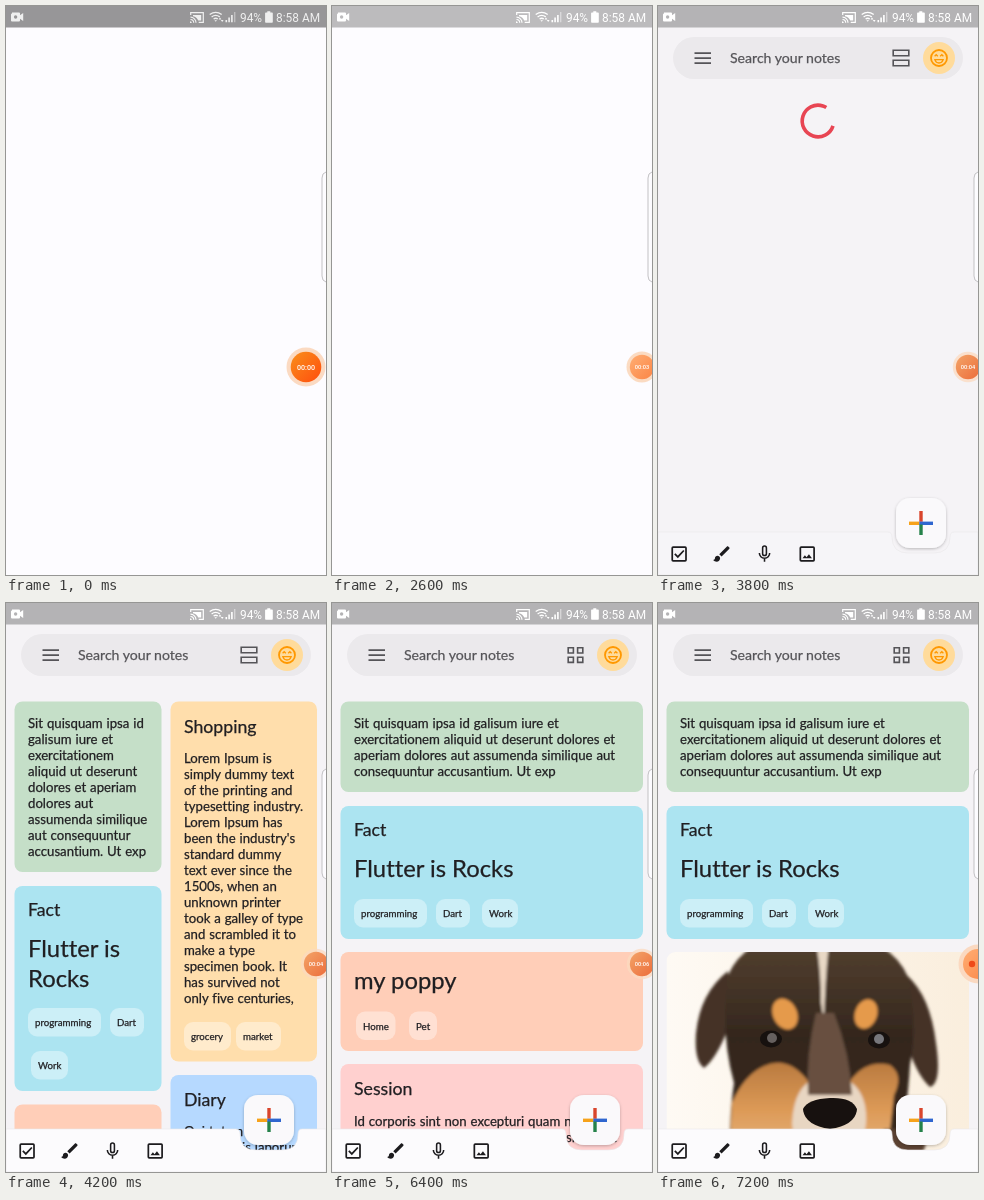
An HTML page for the animation above (8 s loop, 320 px wide and 569 px high).

```html
<!DOCTYPE html>
<html lang="en">
<head>
<meta charset="utf-8">
<title>Notes app</title>
<style>
html, body { margin: 0; width: 100%; height: 100%; overflow: hidden; background: #fdfcff; }
svg { display: block; width: 320px; height: 569px; }
text { font-family: Lato, sans-serif; font-variant-ligatures: none; fill: #201f22; white-space: pre; }
.status text { font: 11.9px Roboto, sans-serif; fill: #fff; }
.body { font-size: 13.2px; word-spacing: .04em; }
.title { font-size: 17.7px; }
.big { font-size: 23.8px; }
.chip { font-size: 9.7px; }
.body, .title, .big, .chip { stroke: #201f22; stroke-width: .25px; }
.line { fill: none; stroke: currentColor; }
#clock { font-family: Roboto, sans-serif; font-weight: 500; fill: #fff; text-anchor: middle; }
</style>
</head>
<body>
<svg viewBox="0 0 320 569">
  <defs>
    <linearGradient id="hot" x2="1" y2="1"><stop stop-color="#f98f1c"/><stop offset="1" stop-color="#ff4d0d"/></linearGradient>
    <linearGradient id="soft" x2="1" y2="1"><stop stop-color="#ffae74"/><stop offset="1" stop-color="#fb8545"/></linearGradient>
    <linearGradient id="dim" x2="1" y2="1"><stop stop-color="#f3a468"/><stop offset="1" stop-color="#ec6c3a"/></linearGradient>
    <linearGradient id="cream"><stop stop-color="#fefaf4"/><stop offset="1" stop-color="#faeedd"/></linearGradient>
    <linearGradient id="fur" x2="0" y2="1"><stop stop-color="#53402f"/><stop offset=".4" stop-color="#33261d"/><stop offset="1" stop-color="#3b2a1f"/></linearGradient>
    <linearGradient id="tan" x2="0" y2="1"><stop stop-color="#b97a3f"/><stop offset=".4" stop-color="#dd9a57"/><stop offset="1" stop-color="#ecc89c"/></linearGradient>
    <clipPath id="photo"><rect x="8.500" y="349" width="302.5" height="240" rx="9"/></clipPath>
    <filter id="blur"><feGaussianBlur stdDeviation="1.6"/></filter>
    <filter id="shadow" x="-30%" y="-30%" width="160%" height="160%">
      <feDropShadow dx="0" dy="1" stdDeviation="1.6" flood-opacity=".25"/>
    </filter>
  </defs>
  <rect width="320" height="569" fill="#fdfcff"/>

  <g data-t="3400 8000">
    <rect y="21" width="320" height="548" fill="#f5f3f6"/>
    <rect x="15" y="31" width="290" height="42" rx="21" fill="#ebe9ec"/>
    <g color="#555458">
      <path class="line" d="M36.500 47.200h16.500M36.500 52.200h16.500M36.500 57.200h16.500" stroke-width="1.7"/>
      <text x="72" y="56.800" font-size="14.1" style="fill:#555458;stroke:#555458;stroke-width:.25px">Search your notes</text>
      <path class="line" data-t="0 6400" d="M235.2 44.2h15.6v5.6h-15.6zM235.2 54.2h15.6v5.6h-15.6z" stroke-width="1.6"/>
      <path class="line" data-t="6400 8000" d="M236.2 44.8h5.2v5.2h-5.2zM245.6 44.8h5.2v5.2h-5.2zM236.2 54.2h5.2v5.2h-5.2zM245.6 54.2h5.2v5.2h-5.2z" stroke-width="1.6"/>
    </g>
    <circle cx="281" cy="52" r="16" fill="#ffdb9b"/>
    <g class="line" color="#ff9800">
      <circle cx="281" cy="52" r="8" stroke-width="1.8"/>
      <path d="M276.600 50.300l1.600-1.600 1.600 1.600M282.200 50.300l1.600-1.600 1.600 1.600" stroke-width="1.3"/>
      <path d="M276.800 53.600h8.400q-1.200 3.400-4.200 3.400t-4.200-3.400z" stroke-width="1.3"/>
    </g>
    <circle id="spin" data-t="3400 4200" cx="160" cy="115" r="15.8" fill="none" stroke="#e84553" stroke-width="3.6" pathLength="360"/>

    <g id="grid" data-t="4200 6400"></g>
    <g id="list" data-t="6400 8000"></g>

    <g data-t="6800 8000" clip-path="url(#photo)">
      <rect x="8.500" y="349" width="302.5" height="220" fill="url(#cream)"/>
      <g filter="url(#blur)">
        <path d="M70 368Q42 390 38 430Q36 458 46 465Q58 456 70 426zM246 370Q272 390 278 440Q284 480 272 484Q254 468 244 420z" fill="#453326"/>
        <path d="M70 372Q82 346 108 338H212Q240 350 250 374Q260 420 252 462Q250 500 238 580H72Q70 520 76 480Q62 430 70 372z" fill="url(#fur)"/>
        <path d="M74 500Q86 472 106 463Q130 452 150 478Q172 466 192 478Q208 456 232 462Q246 472 236 492L226 580H70z" fill="url(#tan)"/>
        <path d="M158 340H171Q167 376 166 420L163 400Q163 366 158 340z" fill="#e9d9c6"/>
        <path d="M134 520Q136 484 156 476H188Q210 488 208 520L200 580H140z" fill="#e8d6c2"/>
        <path d="M158 410Q148 450 150 492H194Q192 450 176 410z" fill="#67503f"/>
        <ellipse cx="127" cy="411" rx="12" ry="16" fill="#e59a4c" transform="rotate(-25 127 411)"/>
        <ellipse cx="208" cy="411" rx="11" ry="15" fill="#e59a4c" transform="rotate(20 208 411)"/>
        <path d="M226 526H266Q276 548 240 580H220z" fill="#5b4330"/>
      </g>
      <g fill="#17110f">
        <ellipse cx="113" cy="436" rx="11" ry="8.5"/>
        <ellipse cx="221" cy="437" rx="11" ry="8.5"/>
        <path d="M145 506Q150 496 172 495T199 506Q198 522 172 526Q146 522 145 506z"/>
      </g>
      <circle cx="114" cy="435" r="5" fill="#66605f"/>
      <circle cx="221" cy="436" r="5" fill="#77777c"/>
    </g>

    <path id="bar" d="M0 526H230Q234 526 234 531Q234 547 250 547H276Q292 547 292 531Q292 526 296 526H320V569H0z" stroke="#e9e7ea" stroke-width=".6"/>
    <rect x="238" y="492" width="50" height="50" rx="14" fill="#faf9fb" filter="url(#shadow)"/>
    <path d="M261.3 505h3.4v10.800h-3.4z" fill="#d9452c"/>
    <path d="M251 515.600h10.500v3.4h-10.500z" fill="#f6a21a"/>
    <path d="M261.3 515.600h13.700v3.4h-13.700z" fill="#2f66cf"/>
    <path d="M261.3 518.500h3.4v10.500h-3.4z" fill="#25824a"/>

    <g color="#1c1b1e" fill="#1c1b1e">
      <g transform="translate(10.8 537.6) scale(.86)">
        <rect class="line" x="4" y="4" width="16" height="16" rx="1" stroke-width="2"/>
        <path class="line" d="M7 12l3.5 3.5L17.5 8" stroke-width="2"/>
      </g>
      <path transform="translate(53.5 537.6) scale(.86)" d="M7 14c-1.66 0-3 1.34-3 3 0 1.31-1.16 2-2 2 .92 1.22 2.49 2 4 2 2.21 0 4-1.79 4-4 0-1.66-1.34-3-3-3zm13.7-9.4l-1.3-1.3c-.4-.4-1-.4-1.4 0L9 12.25 11.75 15l9-9c.4-.4.4-1 0-1.4z"/>
      <g class="line" transform="translate(96.2 537.6) scale(.86)" stroke-width="1.8">
        <rect x="9.8" y="2.9" width="4.4" height="11" rx="2.2"/>
        <path d="M6 11a6 6 0 0 0 12 0M12 17v4"/>
      </g>
      <g transform="translate(138.9 537.6) scale(.86)">
        <rect class="line" x="4" y="4" width="16" height="16" rx="1" stroke-width="2"/>
        <path d="M14 12.3l-2.8 3.5-1.9-2.3L6.5 17h11z"/>
      </g>
    </g>
  </g>

  <path d="M322 166h-2q-4 1-4 6v98q0 5 4 6h2" fill="#fdfcff" stroke="#c2c1c4"/>

  <g class="status">
    <rect id="top" width="320" height="21.5"/>
    <g id="icons" color="#fff" fill="#fff">
      <path d="M6 6.5h7q1 0 1 1v1.8l3.2-2.3v8l-3.2-2.3v1.8q0 1-1 1h-7q-1 0-1-1v-6q0-1 1-1z"/>
      <circle id="lens" cx="9.6" cy="11" r="1.7"/>
      <path class="line" d="M184.7 9v-2.3h12.6v9.6h-4.6M184.5 11.2a5.5 5.5 0 0 1 5.5 5.5M184.5 13.5a3.2 3.2 0 0 1 3.2 3.2" stroke-width="1.2"/>
      <path d="M187 9h8.2v5.4h-3q-1.3-3.4-5.2-4.2zM184 15.2a1.8 1.8 0 0 1 1.8 1.8h-1.8z"/>
      <path class="line" d="M203.7 8.6q6-4.6 12 0M205.6 10.9q4-3 8.2 0M207.6 13q2.1-1.5 4.2 0" stroke-width="1.3"/>
      <path d="M208.4 14.2h2.6l-1.3 1.6zM212.6 13.5l1.4-2 1.4 2zM214.8 14l1.4 2 1.4-2z"/>
      <path d="M219.5 14h1.6v2.2h-1.6zM222.3 11.6h1.6v4.6h-1.6zM225.1 9h1.6v7.2h-1.6z"/>
      <path d="M228 6h1.4v10.2H228z" opacity=".45"/>
      <text x="234" y="15.6">94%</text>
      <path d="M261.3 5.3h3v1.2h1.7q.8 0 .8.8v8.6q0 .8-.8.8h-6.1q-.8 0-.8-.8V7.3q0-.8.8-.8h1.4z"/>
      <text x="270" y="15.6">8:58 AM</text>
    </g>
  </g>

  <g id="bubble">
    <circle id="ring" fill="#fbd9bf"/>
    <circle id="disc"/>
    <text id="clock"></text>
    <circle id="dot" fill="#ee4a18" r="3.2" cx="-6"/>
  </g>
</svg>
<script>
const $ = id => document.getElementById(id);

function add(parent, tag, attrs, text = '') {
  const el = document.createElementNS('http://www.w3.org/2000/svg', tag);
  for (const key in attrs) el.setAttribute(key, attrs[key]);
  el.textContent = text;
  parent.append(el);
}
const card = (p, x, y, width, height, fill) => add(p, 'rect', { x, y, width, height, rx: 8, fill });
const write = (p, cls, x, y, text, step = 16) =>
  text.split('|').forEach((s, i) => add(p, 'text', { class: cls, x, y: y + i * step }, s));
function chip(p, x, y, width, label) {
  add(p, 'rect', { x, y, width, height: 28.5, rx: 9, fill: '#fff', 'fill-opacity': .38 });
  write(p, 'chip', x + 7, y + 18.2, label);
}

const grid = $('grid'), list = $('list');
const green = '#c5dfc8', blue = '#ace4f1', coral = '#ffceb8', sand = '#ffdeac', sky = '#b6d9ff', pink = '#ffd0cf';

card(grid, 8.5, 98.5, 147, 170.5, green);
write(grid, 'body', 22, 124.7, 'Sit quisquam ipsa id|galisum iure et|exercitationem|aliquid ut deserunt|dolores et aperiam|dolores aut|assumenda similique|aut consequuntur|accusantium. Ut exp');
card(grid, 8.5, 283, 147, 205, blue);
write(grid, 'title', 22, 313, 'Fact');
write(grid, 'big', 22, 354, 'Flutter is|Rocks', 30);
chip(grid, 22, 405, 73, 'programming');
chip(grid, 104, 405, 34, 'Dart');
chip(grid, 25, 448, 37, 'Work');
card(grid, 8.5, 501.5, 147, 80, coral);
write(grid, 'big', 22, 537.5, 'my poppy');
card(grid, 164.5, 98.5, 146.5, 360, sand);
write(grid, 'title', 178, 129.5, 'Shopping');
write(grid, 'body', 178, 159.7, "Lorem Ipsum is|simply dummy text|of the printing and|typesetting industry.|Lorem Ipsum has|been the industry's|standard dummy|text ever since the|1500s, when an|unknown printer|took a galley of type|and scrambled it to|make a type|specimen book. It|has survived not|only five centuries,");
chip(grid, 178, 419, 47, 'grocery');
chip(grid, 230, 419, 45, 'market');
card(grid, 164.5, 472, 146.5, 110, sky);
write(grid, 'title', 178, 502.5, 'Diary');
write(grid, 'body', 178, 532.7, 'Qui totam|cum debitis laborum');

card(list, 8.5, 98.5, 302.5, 90.5, green);
write(list, 'body', 22, 124.7, 'Sit quisquam ipsa id galisum iure et|exercitationem aliquid ut deserunt dolores et|aperiam dolores aut assumenda similique aut|consequuntur accusantium. Ut exp');
card(list, 8.5, 203, 302.5, 133, blue);
write(list, 'title', 22, 233, 'Fact');
write(list, 'big', 22, 274, 'Flutter is Rocks');
chip(list, 22, 296, 73, 'programming');
chip(list, 104, 296, 34, 'Dart');
chip(list, 150, 296, 36, 'Work');

const pet = $('list').appendChild(document.createElementNS('http://www.w3.org/2000/svg', 'g'));
pet.dataset.t = '6400 6800';
card(pet, 8.5, 349, 302.5, 99, coral);
write(pet, 'big', 22, 386, 'my poppy');
chip(pet, 24, 408.5, 39.5, 'Home');
chip(pet, 77, 408.5, 28, 'Pet');
card(pet, 8.5, 461, 302.5, 120, pink);
write(pet, 'title', 22, 492, 'Session');
write(pet, 'body', 22, 522.5, 'Id corporis sint non excepturi quam nobis');
write(pet, 'body', 234, 538.5, 'sit fugiat');

const set = (id, attrs) => { for (const key in attrs) $(id).setAttribute(key, attrs[key]); };
// start time, centre x, ring radius, disc radius, disc paint
const poses = [
  [0, 300, 19.5, 15.3, 'hot'], [1600, 310, 15.5, 12.2, 'soft'], [3400, 310, 15.2, 12.2, 'dim'],
  [6600, 310, 16.5, 13, 'hot'], [6800, 320, 19.5, 15, 'hot'], [7000, 320, 19.5, 15, 'soft']
];
const ticks = [600, 1600, 2600, 3400, 4600, 5600, 6600];
// start time, arc start and length in degrees
const arcs = [[3400, -80, 40], [3600, -35, 170], [3800, 18, 284]];
const last = (rows, t) => rows.filter(r => r[0] <= t).pop();
const timed = [...document.querySelectorAll('[data-t]')].map(el => [el, ...el.dataset.t.split(' ').map(Number)]);

function draw() {
  const t = performance.now() % 8000;
  for (const [el, from, to] of timed) el.style.display = t >= from && t < to ? '' : 'none';

  const shade = t < 200 ? '#979698' : t < 3400 ? '#bcbbbd' : '#b4b3b5';
  set('top', { fill: shade });
  set('lens', { fill: shade });
  set('icons', { opacity: t < 200 ? .85 : 1 });
  set('bar', { fill: t < 4200 ? '#f6f5f8' : '#fcfbfd' });

  const [, start, sweep] = last(arcs, t) || arcs[0];
  set('spin', { 'stroke-dasharray': `${sweep} ${360 - sweep}`, transform: `rotate(${start} 160 115)` });

  const [, x, ring, disc, paint] = last(poses, t), stopped = t >= 7000;
  set('bubble', { transform: `translate(${x} 361)` });
  set('ring', { r: ring, 'fill-opacity': paint === 'dim' ? .75 : .95 });
  set('disc', { r: disc, fill: `url(#${paint})` });
  set('clock', { 'font-size': disc * .465, y: disc * .17 });
  $('clock').textContent = stopped ? '' : '00:0' + ticks.filter(k => k <= t).length;
  $('dot').style.display = stopped ? '' : 'none';
  requestAnimationFrame(draw);
}
draw();
</script>
</body>
</html>
```
